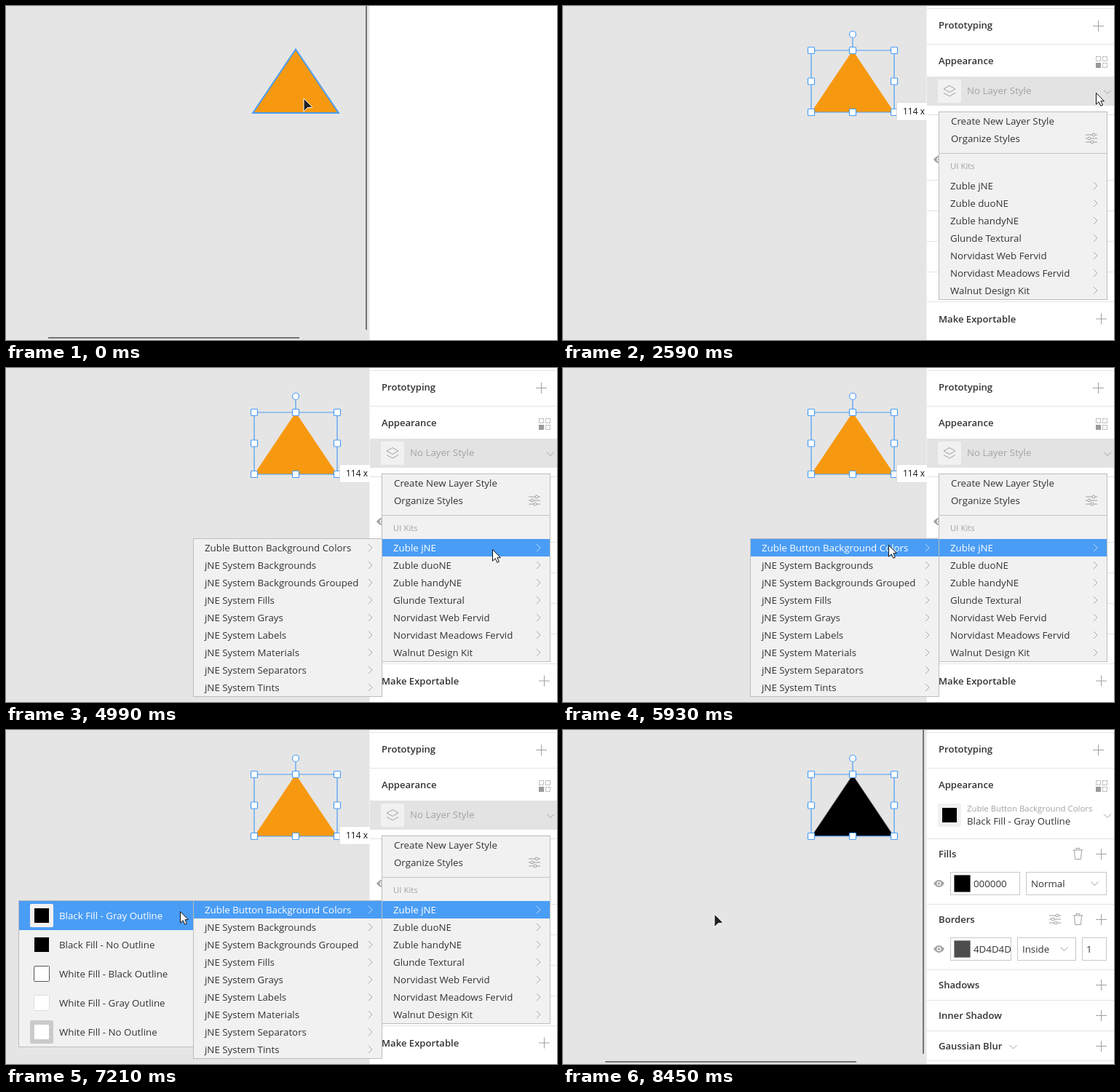
Recreate the animation shown at these times as an HTML page. Size 757 by 459 pixels, loop 9760 ms.

```html
<!DOCTYPE html>
<html lang="en">
<head>
<meta charset="utf-8">
<title>Applying a layer style</title>
<style>
  html, body { margin: 0; width: 100%; height: 100%; overflow: hidden; background: #fff; }
  svg { display: block; width: 757px; height: 459px; }
  text { font: 13.3px "Open Sans", "Noto Sans", sans-serif; fill: #333; white-space: pre; }
  .head { font-weight: 600; font-size: 13.1px; }
  .small { font-size: 11.4px; }
  .size { font-size: 12px; fill: #111; }
  .muted { fill: #a3a3a3; }
  .white { fill: #fff; }
  .icon { fill: none; stroke: #a0a0a0; stroke-width: 1; }
  .rule { fill: #e3e3e3; }
  .box { fill: #fff; stroke: #c9c9c9; }
  .label { fill: #fff; stroke: #dcdcdc; }
  .menu { fill: #f1f1f1; stroke: #bdbdbd; }
  .handle { fill: #fff; stroke: #4a9df5; stroke-width: 1.2; }
</style>
</head>
<body>
<svg id="stage" viewBox="0 0 757 459" xmlns="http://www.w3.org/2000/svg"></svg>
<script>
const LOOP = 9760, BLUE = '#4a9df5', ORANGE = '#f79910';
const stage = document.getElementById('stage');

// ---- drawing helpers ----
const rect = (x, y, w, h, fill) => `<rect x="${x}" y="${y}" width="${w}" height="${h}" fill="${fill}"/>`;
const frame = (x, y, w, h, cls) => `<rect x="${x + .5}" y="${y + .5}" width="${w - 1}" height="${h - 1}" class="${cls}"/>`;
const tile = (x, y, fill) => `<rect x="${x}" y="${y}" width="32" height="32" rx="2" fill="${fill}"/>`;
const text = (x, y, s, cls = '') => `<text x="${x}" y="${y}" class="${cls}">${s}</text>`;
const icon = (d, color = '#a0a0a0') => `<path class="icon" d="${d}" style="stroke:${color}"/>`;
const rule = y => `<rect x="500" y="${y}" width="257" height="1" class="rule"/>`;
const plus = (x, y) => icon(`M${x - 7.5} ${y}h15M${x} ${y - 7.5}v15`);
const down = (x, y) => icon(`M${x - 5} ${y - 2.5}l5 5 5-5`);
const right = (x, y, color) => icon(`M${x - 2.5} ${y - 5}l5 5-5 5`, color);
const trash = y => icon(`M700.5 ${y - 5}h14M705 ${y - 5}v-2.5h5v2.5M702.5 ${y - 5}l1 12.5h8l1-12.5`);
const eye = y => `<path d="M509 ${y}q7.5-10 15 0q-7.5 10-15 0z" fill="#a3a3a3"/>
  <circle cx="516.5" cy="${y}" r="3" fill="#fff"/><circle cx="516.5" cy="${y}" r="1.7" fill="#a3a3a3"/>`;
const sliders = (x, y) => [[-5, 3], [0, -3], [5, 1]].map(([dy, dx]) =>
  icon(`M${x - 8} ${y + dy + .5}h${6 + dx}m4 0h${6 - dx}`) +
  `<circle class="icon" cx="${x + dx}" cy="${y + dy + .5}" r="2"/>`).join('');
// Timed group: fades in over nIn steps from "start", out over nOut steps from "end".
const during = (start, end, body, nIn = 1, nOut = 1) =>
  `<g data-on="${start},${nIn},${end},${nOut}">${body}</g>`;

// ---- canvas ----
const handles = [341, 398, 455].flatMap(x => [61, 103.5, 146].map(y => [x, y]))
  .filter(([x, y]) => x !== 398 || y !== 103.5)
  .map(([x, y]) => `<rect class="handle" x="${x - 4.5}" y="${y - 4.5}" width="9" height="9" rx="1"/>`).join('');
const selection = `<path d="M341 61h114v85h-114zM398 61V43" fill="none" stroke="${BLUE}" stroke-width="1.2"/>
  ${handles}<circle class="handle" cx="398" cy="39" r="4.5"/>`;
const bars = rect(494, 0, 2, 445, '#747474') + rect(58, 455, 345, 2, '#747474');

const canvas = rect(0, 0, 500, 459, '#e5e5e5') +
  during(0, 1330, bars) + during(7980, LOOP, bars) +
  during(0, 610, `<path d="M398 59.5L457 147H339.2z" fill="${ORANGE}" stroke="${BLUE}" stroke-width="2"/>`) +
  during(610, 8060, `<path d="M398 61L455 146H341z" fill="${ORANGE}"/>`) +
  during(8060, LOOP, '<path d="M398 62L454 145.5H342z" stroke="#4d4d4d"/>') +
  during(610, LOOP, selection) +
  during(790, 8060, frame(458, 132, 60, 26, 'label') + text(467, 149, '114 x 85', 'size'));

// ---- side panel ----
const section = (top, y, title) => rule(top) + text(516, y + 5, title, 'head');
const plain = (top, y, title) => section(top, y, title) + plus(739.5, y + .5);
const lower = dy => plain(281 + dy, 302 + dy, 'Shadows') + plain(323 + dy, 344 + dy, 'Inner Shadow') +
  plain(365 + dy, 386 + dy, 'Gaussian Blur') + down(618.5, 387.5 + dy) + plain(406 + dy, 429.5 + dy, 'Make Exportable');
const swatchBox = (y, w, fill, hex) => frame(532, y, w, 32, 'box') + rect(537, y + 4, 23, 24, '#ddd') +
  rect(537.5, y + 4.5, 22, 23, fill) + text(564, y + 21, hex);
const select = (x, y, w, s) => frame(x, y, w, 32, 'box') + text(x + 7, y + 21, s) + down(x + w - 16.5, y + 16);
const cell = (x, y) => `<rect class="icon" x="${x}" y="${y}" width="6" height="6" stroke-dasharray="2 1"/>`;

const panel = rect(499.5, 0, 258, 459, '#fff') + during(700, LOOP,
  section(3, 26, 'Prototyping') + plus(735.5, 27.5) +
  section(52, 75, 'Appearance') + cell(732.5, 69.5) + cell(741.5, 69.5) + cell(741.5, 78.5) + rect(732, 78, 7, 7, '#9a9a9a') +
  during(1330, 2510, rect(500, 97, 257, 40, '#f1f1f1')) +
  during(2510, 8450, rect(500, 97, 257, 40, '#e3e3e3')) +
  tile(515, 101, '#f1f1f1') + down(748, 118) +
  during(700, 8280, icon('M523 114l8-4.5 8 4.5-8 4.5zM523 119.5l8 4.5 8-4.5') + text(555, 121, 'No Layer Style', 'muted')) +
  during(8280, LOOP, rect(521, 107, 20, 20, '#000') + text(555, 112, 'Zuble Button Background Colors', 'small muted') +
    text(555, 130, 'Black Fill - Gray Outline')) +
  plain(149, 170, 'Fills') + trash(170) + eye(211) +
  during(700, 8280, swatchBox(195, 96, ORANGE, 'F79910')) +
  during(8280, LOOP, swatchBox(195, 96, '#000', '000000')) +
  select(636, 195, 111, 'Normal') +
  plain(239, 260, 'Borders') +
  during(700, 8280, lower(0)) +
  during(8280, LOOP, sliders(676, 259.5) + trash(260) + eye(301) + swatchBox(285, 84, '#4d4d4d', '4D4D4D') +
    select(624, 285, 81, 'Inside') + frame(713, 285, 34, 32, 'box') + text(719, 306, '1') + lower(48)));

// ---- menus ----
const kits = ['Zuble jNE', 'Zuble duoNE', 'Zuble handyNE', 'Glunde Textural', 'Norvidast Web Fervid',
  'Norvidast Meadows Fervid', 'Walnut Design Kit'];
const groups = ['Zuble Button Background Colors', ...['Backgrounds', 'Backgrounds Grouped', 'Fills', 'Grays',
  'Labels', 'Materials', 'Separators', 'Tints'].map(s => 'jNE System ' + s)];
// Name, fill, optional outline, optional tile behind the swatch.
const styles = [['Black Fill - Gray Outline', '#000', '', '#f1f1f1'], ['Black Fill - No Outline', '#000'],
  ['White Fill - Black Outline', '#fff', '#555'], ['White Fill - Gray Outline', '#fff', '#dcdcdc'],
  ['White Fill - No Outline', '#fff', '', '#cacaca']];

const item = (x, arrow, s, i, cls) => text(x, 252 + 24 * i, s, cls) +
  right(arrow, 247 + 24 * i, cls ? '#b9d9fb' : '#a8a8a8');
const list = (x, arrow, names) => names.map((s, i) => item(x, arrow, s, i)).join('');
const styleItem = ([s, fill, line, back], i, cls) => {
  const y = 235 + 40 * i;
  const swatch = line
    ? `<rect x="38.5" y="${y + 9.5}" width="21" height="21" rx="1" fill="${fill}" stroke="${line}"/>`
    : rect(39, y + 10, 20, 20, fill);
  return (back ? tile(33, y + 4, back) : '') + swatch + text(73, y + 25, s, cls);
};

const mainMenu = frame(516, 145, 232, 259, 'menu') +
  text(533, 163, 'Create New Layer Style') + text(533, 187, 'Organize Styles') + sliders(726, 181.5) +
  rect(517, 202, 230, 1, '#c4c4c4') + text(532, 224, 'UI Kits', 'small muted') + list(532, 731.5, kits) +
  during(3915, 4070, rect(517, 146, 230, 24, BLUE) + text(533, 163, 'Create New Layer Style', 'white')) +
  during(4070, 4220, rect(517, 170, 230, 24, BLUE) + text(533, 187, 'Organize Styles', 'white') + sliders(726, 181.5)) +
  during(4530, LOOP, rect(517, 235, 230, 24, BLUE) + item(532, 731.5, kits[0], 0, 'white'));
const groupMenu = frame(257, 234, 260, 218, 'menu') + list(273, 500.5, groups) +
  during(5770, LOOP, rect(258, 235, 258, 24, BLUE) + item(273, 500.5, groups[0], 0, 'white'));
const styleMenu = frame(17, 234, 241, 202, 'menu') + styles.map((s, i) => styleItem(s, i)).join('') +
  during(7200, 7670, rect(18, 235, 239, 40, BLUE) + styleItem(styles[0], 0, 'white'));

const menus = during(2510, 7820, mainMenu, 2, 3) + during(4840, 7820, groupMenu, 3, 3) +
  during(6080, 7820, styleMenu, 3, 3);

// ---- pointer ----
const dark = '<path d="M0 0V18L5 12.8L12 12z" fill="#222" stroke="#fff" stroke-width="1"/>';
const light = '<path d="M.5 .5V16.2L4.2 12.7L6.8 18.3L9.4 17.1L6.9 11.7H11.4z" fill="#fff" stroke="#111"/>';
const pointer = `<g id="pointer">${during(0, 1330, dark)}${during(1330, 7980, light)}${during(7980, LOOP, dark)}</g>`;

stage.innerHTML = canvas + panel + menus + pointer;

// ---- timing ----
// Bursts of movement: start, end, number of positions.
const bursts = [[1170, 2120, 13], [2360, 2360, 1], [2510, 2590, 2], [3760, 4610, 12], [4840, 4990, 3],
  [5310, 5540, 4], [5690, 5930, 4], [6080, 6640, 8], [6810, 7440, 9], [7670, 7670, 1]];
// Pointer path: time, x, y.
const path = [[0, 409, 127], [1090, 409, 127], [1170, 424, 128], [1328, 525, 126], [1407, 554, 125],
  [1800, 680, 121], [2041, 732, 114], [2120, 721, 112], [2360, 732, 106], [2510, 732, 119], [3680, 732, 119],
  [4300, 676, 215], [4455, 671, 236], [4610, 668, 249], [5230, 668, 249], [5540, 519, 244], [5690, 505, 243],
  [5930, 447, 243], [6240, 447, 243], [6400, 440, 231], [6640, 445, 243], [6810, 430, 243], [7203, 239, 249],
  [7440, 208, 253], [LOOP, 208, 253]];

function hold(t) {
  const b = bursts.filter(([s]) => s <= t).pop();
  if (!b) return 0;
  const [s, e, n] = b;
  if (n === 1 || t >= e) return e;
  const step = (e - s) / (n - 1);
  return s + step * Math.floor((t - s + 6) / step);
}

function place(t) {
  const i = Math.max(1, path.findIndex(p => p[0] >= t));
  const [t0, x0, y0] = path[i - 1], [t1, x1, y1] = path[i];
  const k = (t - t0) / (t1 - t0);
  return [x0 + (x1 - x0) * k, y0 + (y1 - y0) * k].map(Math.round);
}

const ramp = (t, from, n) => Math.min(1, Math.max(0, (Math.floor((t - from) / 75) + 1) / n));
const timed = [...stage.querySelectorAll('[data-on]')].map(el => [el, el.dataset.on.split(',').map(Number)]);
const hand = document.getElementById('pointer');
const begin = performance.now();

function draw() {
  const t = (performance.now() - begin) % LOOP;
  for (const [el, [start, nIn, end, nOut]] of timed) {
    const o = ramp(t, start, nIn) * (1 - ramp(t, end, nOut));
    el.style.display = o ? '' : 'none';
    el.style.opacity = o;
  }
  hand.setAttribute('transform', `translate(${place(hold(t))})`);
  requestAnimationFrame(draw);
}
draw();
</script>
</body>
</html>
```
